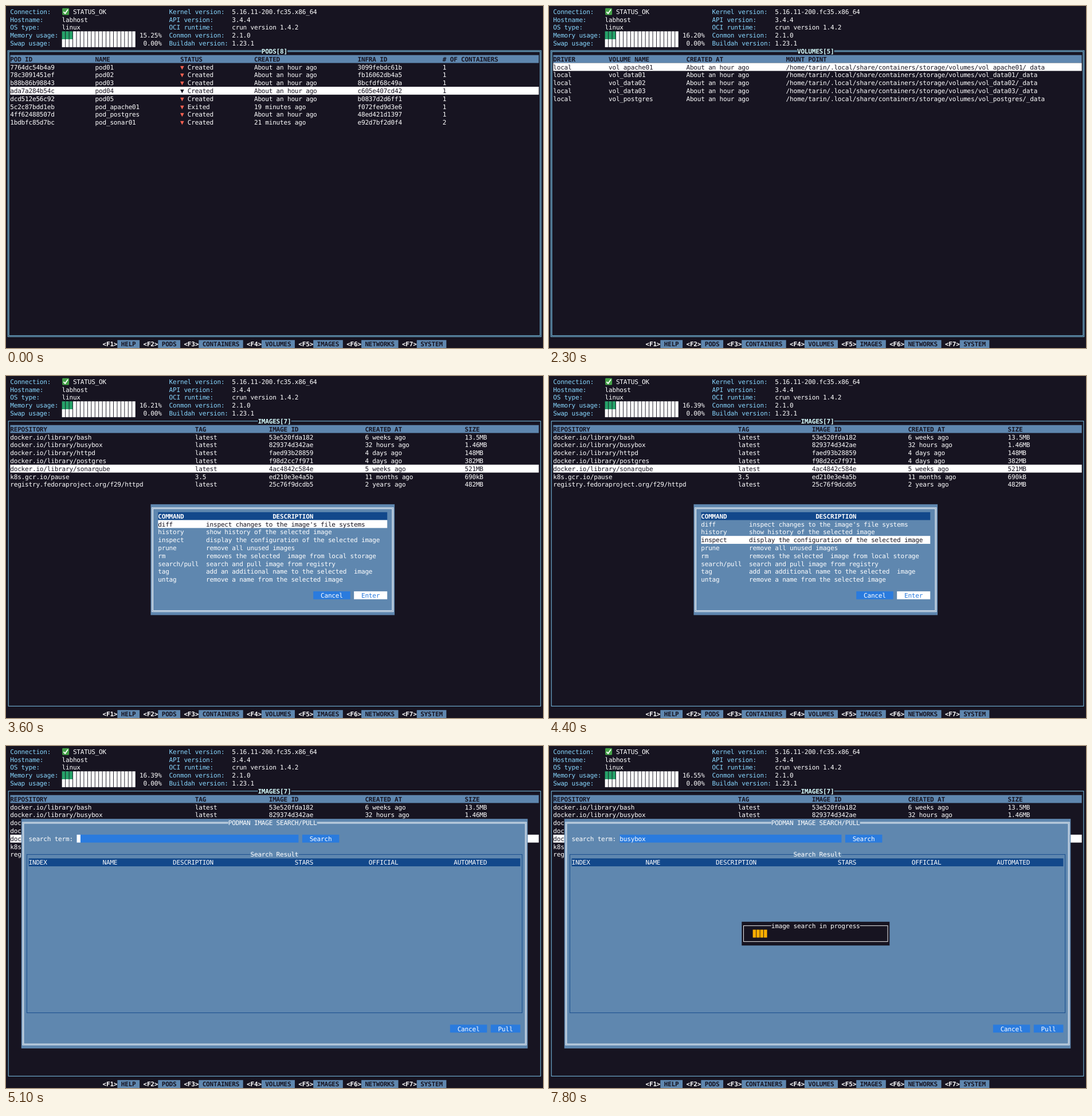
An HTML page for the animation above (8 s loop, 937x597 px).

```html
<!DOCTYPE html>
<html lang="en">
<head>
<meta charset="utf-8">
<title>Terminal UI</title>
<style>
html, body { margin: 0; width: 100%; height: 100%; overflow: hidden; background: #171421; }
svg { display: block; width: 937px; height: 597px; }
text {
  font: 12px "DejaVu Sans Mono", monospace;
  letter-spacing: -0.2246px;
  white-space: pre;
  text-rendering: geometricPrecision;
  font-variant-ligatures: none;
}
.b { font-weight: bold; }
</style>
</head>
<body>
<svg id="stage" viewBox="0 0 1017 648" preserveAspectRatio="none" xmlns="http://www.w3.org/2000/svg"></svg>
<script>
const LOOP = 8000;
const BG = '#171421', WHITE = '#ffffff', SKY = '#87d7ff', STEEL = '#5f87af', NAVY = '#12488b',
  BLUE = '#2a7bde', GREEN = '#26a269', RED = '#f66151', ORANGE = '#ffaf00', CYAN = '#d7ffff';

// Terminal cells are 7 by 15 units
const CW = 7, CH = 15;
const X = c => 1 + CW * c;
const Y = r => 3 + CH * r;

const rect = (x, y, w, h, color) =>
  `<rect x="${x}" y="${y}" width="${w}" height="${h}" fill="${color}"/>`;

const fill = (c, r, cols, rows, color) => rect(X(c), Y(r), cols * CW, rows * CH, color);

function text(c, r, s, color = WHITE, bold = false) {
  const safe = s.replace(/&/g, '&amp;').replace(/</g, '&lt;');
  return `<text x="${X(c) - 0.1}" y="${Y(r) + 12}" fill="${color}"${bold ? ' class="b"' : ''}>${safe}</text>`;
}

// Border running through the middle of the outermost cells
function border(c, r, cols, rows, color, double) {
  const ring = d => `<rect x="${X(c) + 3.5 + d}" y="${Y(r) + 7.5 + d}" width="${(cols - 1) * CW - 2 * d}" ` +
    `height="${(rows - 1) * CH - 2 * d}" fill="none" stroke="${color}"/>`;
  return double ? ring(-1) + ring(1) : ring(0);
}

function title(c, r, s, back, color = WHITE, bold = false) {
  return fill(c, r, s.length, 1, back) + text(c, r, s, color, bold);
}

function button(c, r, label, back = BLUE, color = WHITE) {
  return fill(c, r, label.length + 4, 1, back) + text(c + 2, r, label, color);
}

function blocks(c, r, n, color) {
  let s = '';
  for (let i = 0; i < n; i++) s += rect(X(c + i), Y(r), CW - 1, CH, color);
  return s;
}

// Value of the last step that has begun
function at(t, steps) {
  let value = steps[0][1];
  for (const [start, v] of steps) if (t >= start) value = v;
  return value;
}

const HOUR = 'About an hour ago', DOWN = '▼ Created';
const split = s => s.split('|');

const pods = [
  `7764dc54b4a9|pod01|${DOWN}|${HOUR}|3099febdc61b|1`,
  `78c3091451ef|pod02|${DOWN}|${HOUR}|fb16062db4a5|1`,
  `b88b86b98843|pod03|${DOWN}|${HOUR}|8bcfdf68c49a|1`,
  `ada7a284b54c|pod04|${DOWN}|${HOUR}|c605e407cd42|1`,
  `dcd512e56c92|pod05|${DOWN}|${HOUR}|b0837d2d6ff1|1`,
  '5c2c87bdd1eb|pod_apache01|▼ Exited|19 minutes ago|f072fed9d3e6|1',
  `4ff62488507d|pod_postgres|${DOWN}|${HOUR}|48ed421d1397|1`,
  `1bdbfc85d7bc|pod_sonar01|${DOWN}|21 minutes ago|e92d7bf2d0f4|2`
].map(split);

const containers = pods.map(([id, , status, age, infra]) =>
  [infra, 'k8s.gcr.io/pause:3.5', id, age, status, id + '-infra', '']);
containers.push(['a41c7be0925d', 'docker.io/library/sonarqube:latest', '1bdbfc85d7bc',
  '21 minutes ago', DOWN, 'sonar01', '']);

const volumes = ['apache01', 'data01', 'data02', 'data03', 'postgres'].map(n =>
  ['local', 'vol_' + n, HOUR, `/home/tarin/.local/share/containers/storage/volumes/vol_${n}/_data`]);

const images = [
  'docker.io/library/bash|latest|53e520fda182|6 weeks ago|13.5MB',
  'docker.io/library/busybox|latest|829374d342ae|32 hours ago|1.46MB',
  'docker.io/library/httpd|latest|faed93b28859|4 days ago|148MB',
  'docker.io/library/postgres|latest|f98d2cc7f971|4 days ago|382MB',
  'docker.io/library/sonarqube|latest|4ac4842c584e|5 weeks ago|521MB',
  'k8s.gcr.io/pause|3.5|ed210e3e4a5b|11 months ago|690kB',
  'registry.fedoraproject.org/f29/httpd|latest|25c76f9dcdb5|2 years ago|482MB'
].map(split);

const pages = {
  PODS: { cols: [1, 24, 47, 67, 95, 118], rows: pods, sel: 3,
    head: split('POD ID|NAME|STATUS|CREATED|INFRA ID|# OF CONTAINERS') },
  CONTAINERS: { cols: [1, 18, 57, 74, 96, 110, 133], rows: containers, sel: 0,
    head: split('CONTAINER ID|IMAGE|POD|CREATED|STATUS|NAMES|PORTS') },
  VOLUMES: { cols: [1, 16, 37, 64], rows: volumes, sel: 0,
    head: split('DRIVER|VOLUME NAME|CREATED AT|MOUNT POINT') },
  IMAGES: { cols: [1, 51, 71, 97, 124], rows: images, sel: 4,
    head: split('REPOSITORY|TAG|IMAGE ID|CREATED AT|SIZE') }
};

const commands = [
  'diff|inspect changes to the image\'s file systems',
  'history|show history of the selected image',
  'inspect|display the configuration of the selected image',
  'prune|remove all unused images',
  'rm|removes the selected  image from local storage',
  'search/pull|search and pull image from registry',
  'tag|add an additional name to the selected  image',
  'untag|remove a name from the selected image'
].map(split);

function infoBar(mem) {
  const left = ['Connection:', 'Hostname:', 'OS type:', 'Memory usage:', 'Swap usage:'];
  const right = ['Kernel version:|5.16.11-200.fc35.x86_64', 'API version:|3.4.4',
    'OCI runtime:|crun version 1.4.2', 'Conmon version:|2.1.0', 'Buildah version:|1.23.1'];
  let s = left.map((l, r) => text(1, r, l, SKY)).join('');
  right.map(split).forEach(([k, v], r) => s += text(44, r, k, SKY) + text(61, r, v));
  s += '<rect x="106.5" y="4.2" width="13" height="12.8" rx="1.6" fill="#43a047"/>' +
    '<path d="M109 11l3 3.2 5.3-7.6" fill="none" stroke="#fff" stroke-width="2"/>';
  s += text(18, 0, 'STATUS_OK') + text(15, 1, 'labhost') + text(15, 2, 'linux');
  s += blocks(15, 3, 3, GREEN) + blocks(18, 3, 17, WHITE) + blocks(15, 4, 20, WHITE);
  return s + text(36, 3, mem + '%') + text(37, 4, '0.00%');
}

function table(name, focused) {
  const { cols, head, rows, sel } = pages[name];
  const label = `${name}[${rows.length}]`;
  let s = border(0, 5, 145, 37, SKY, focused) +
    title(1 + Math.floor((143 - label.length) / 2), 5, label, BG, CYAN, true) +
    fill(1, 6, 143, 1, STEEL);
  head.forEach((h, i) => s += text(cols[i], 6, h, BG, true));
  rows.forEach((row, n) => {
    const on = n === sel, r = 7 + n, ink = on ? BG : WHITE;
    if (on) s += fill(1, r, 143, 1, WHITE);
    row.forEach((v, i) => {
      if (on) v = v.replace(/_/g, ' ');
      s += v[0] === '▼'
        ? text(cols[i], r, '▼', on ? BG : RED) + text(cols[i] + 2, r, v.slice(2), ink)
        : text(cols[i], r, v, ink);
    });
  });
  return s;
}

function footer() {
  let c = 26, s = '';
  'HELP PODS CONTAINERS VOLUMES IMAGES NETWORKS SYSTEM'.split(' ').forEach((k, i) => {
    s += text(c, 42, `<F${i + 1}>`, WHITE, true) +
      fill(c + 4, 42, k.length + 2, 1, STEEL) + text(c + 5, 42, k, BG, true);
    c += k.length + 7;
  });
  return s;
}

function commandDialog(sel) {
  let s = fill(39, 16, 66, 14, STEEL) + border(39, 16, 66, 14, WHITE, true) +
    fill(41, 17, 62, 1, NAVY) + text(41, 17, 'COMMAND', WHITE, true) + text(72, 17, 'DESCRIPTION', WHITE, true);
  commands.forEach(([name, about], i) => {
    const on = i === sel, ink = on ? BG : WHITE;
    if (on) s += fill(41, 18 + i, 62, 1, WHITE);
    s += text(41, 18 + i, name, ink) + text(54, 18 + i, about, ink);
  });
  return s + button(83, 27, 'Cancel') + button(94, 27, 'Enter', WHITE, BLUE);
}

function searchDialog(typed, cursor) {
  let s = fill(4, 9, 137, 29, STEEL) + border(4, 9, 137, 29, WHITE, true) +
    title(60, 9, 'PODMAN IMAGE SEARCH/PULL', STEEL);
  s += text(6, 11, 'search term:') + fill(19, 11, 60, 1, BLUE) + text(19, 11, typed) + button(80, 11, 'Search');
  if (cursor) s += fill(19 + typed.length, 11, 1, 1, WHITE);
  s += border(5, 13, 135, 21, NAVY) + title(66, 13, 'Search Result', STEEL) + fill(6, 14, 133, 1, NAVY);
  const cols = [6, 26, 45, 78, 98, 121];
  split('INDEX|NAME|DESCRIPTION|STARS|OFFICIAL|AUTOMATED').forEach((h, i) => s += text(cols[i], 14, h));
  return s + button(120, 35, 'Cancel') + button(131, 35, 'Pull');
}

function progress(pos) {
  return fill(52, 22, 40, 3, BG) + border(52, 22, 40, 3, WHITE) +
    title(60, 22, 'image search in progress', BG) + blocks(pos, 23, 4, ORANGE);
}

const memory = [[0, '15.25'], [400, '15.31'], [1400, '16.20'], [2400, '16.21'], [4400, '16.39'],
  [5500, '16.46'], [6500, '16.53'], [7500, '16.55']];
const page = [[0, 'PODS'], [1800, 'CONTAINERS'], [2300, 'VOLUMES'], [2800, 'IMAGES']];
const choice = [[0, 0], [4200, 1], [4400, 2], [4500, 3], [4700, 4], [4800, 5]];
const keys = [[0, 0], [5700, 1], [6000, 2], [6200, 3], [6300, 4], [6500, 5], [6800, 6], [7000, 7]];

function scene(t) {
  let s = rect(0, 0, 1017, 648, BG) + infoBar(at(t, memory)) + table(at(t, page), t < 3600) + footer();
  if (t >= 5100) {
    const cursor = t < 7800 && !(t >= 5700 && t < 5800);
    s += searchDialog('busybox'.slice(0, at(t, keys)), cursor);
  } else if (t >= 3600) s += commandDialog(at(t, choice));
  if (t >= 7200) s += progress(t < 7500 ? 54 : 55);
  return s;
}

const stage = document.getElementById('stage');
const start = performance.now();
let shown = -1;

function tick() {
  const step = Math.floor(((performance.now() - start) % LOOP) / 100);
  if (step !== shown) {
    shown = step;
    stage.innerHTML = scene(step * 100);
  }
  requestAnimationFrame(tick);
}
tick();
</script>
</body>
</html>
```
